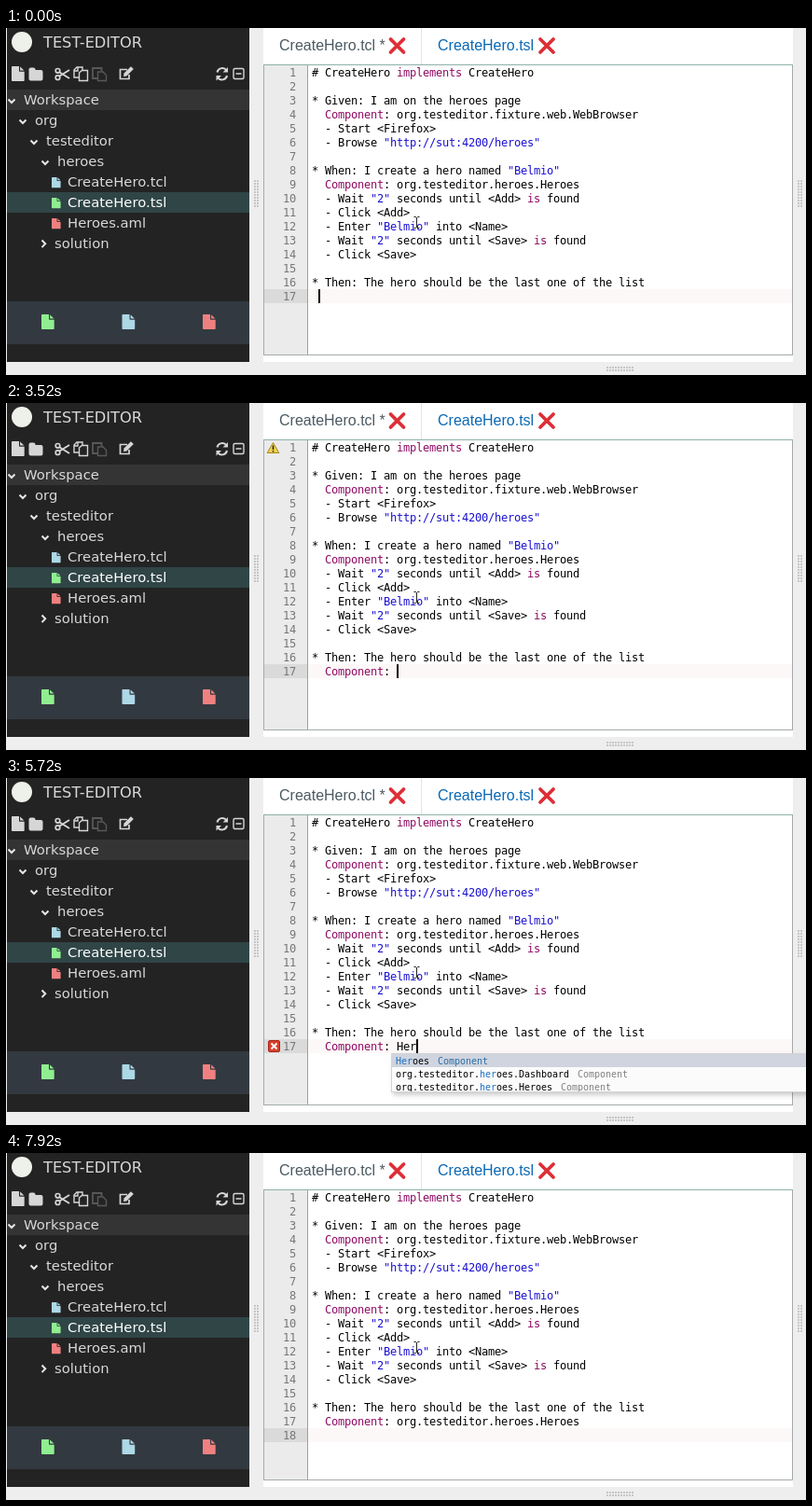
Write an HTML page that moves like this. It is 858 by 372 pixels and loops after 8000 ms.

```html
<!DOCTYPE html>
<html lang="en">
<head>
<meta charset="utf-8">
<title>Test editor</title>
<style>
  html, body { margin: 0; width: 100%; height: 100%; overflow: hidden; background: #eee; }
  #stage { position: absolute; left: 0; top: 0; width: 858px; height: 372px; overflow: hidden; }
  #stage div, #stage svg { position: absolute; }
  .text { white-space: pre; line-height: 22px; font-kerning: none; }
  .side { font: 14.8px/22px "DejaVu Sans", sans-serif; color: #d8d8d8; }
  .title { font: 16.2px/22px "DejaVu Sans", sans-serif; color: #d8d8d8; }
  .tab { font: 16px/22px "Liberation Sans", Arial, sans-serif; }
  .code { font: 12px/15px "DejaVu Sans Mono", monospace; white-space: pre; color: #000; }
  .small { font: 10px/16px "DejaVu Sans Mono", monospace; white-space: pre; color: #000; }
  .key { color: #8f0a63; }
  .str { color: #1a10d0; }
  #popup { left: 413px; top: 295px; width: 600px; box-sizing: border-box; overflow: hidden;
    background: #fbfbfb; border: 1px solid #d3d3d3; box-shadow: 2px 3px 5px rgba(0,0,0,.2); }
  #stage #popup .row { position: static; height: 14px; padding-left: 4px; }
  #popup .meta { color: #808080; margin-left: 9px; }
  #popup .hit { color: #1a6fc4; }
  #popup .on { background: #cfd4df; }
  #popup .on .meta { color: #2b6ea8; }
</style>
</head>
<body>
<div id="stage"></div>
<script>
const stage = document.getElementById('stage');

function el(parent, cls, text = '', css = {}) {
  const node = document.createElement('div');
  node.className = cls;
  node.textContent = text;
  Object.assign(node.style, css);
  parent.append(node);
  return node;
}
const px = n => n + 'px';
const box = (x, y, w, h, background) =>
  el(stage, '', '', { left: px(x), top: px(y), width: px(w), height: px(h), background });
const label = (cls, x, y, text, color) =>
  el(stage, 'text ' + cls, text, { left: px(x), top: px(y), ...(color && { color }) });

function span(parent, cls, text) {
  const node = document.createElement('span');
  node.className = cls;
  node.textContent = text;
  parent.append(node);
}

// Whole-pixel character cells, as a code editor lays them out
function cellSpacing(cls, cell) {
  const probe = el(stage, cls, '0'.repeat(100));
  const width = probe.getBoundingClientRect().width / 100;
  probe.remove();
  return px(cell - width);
}
const codeGap = cellSpacing('code', 7);
const smallGap = cellSpacing('small', 6);

// Panels
box(1, 0, 260, 357.5, '#232323');
box(1, 66, 260, 22, '#343434');
box(1, 176, 260, 22, '#304546');
box(1, 293, 260, 46, '#333940');
box(276, 0, 568, 357.5, '#fff');
box(445, 0, 1, 39, '#dfe6e5');
box(276, 39, 568, 312, '#a3abaa');
box(276, 39, 568, 1, '#8db0aa');
box(277, 40, 566, 310, '#fff');
box(277, 40, 46, 310, '#ebebeb');
box(323, 40, 1, 310, '#9f9f9f');
const activeGutter = box(277, 280, 46, 15, '#dadada');
const activeLine = box(324, 280, 519, 15, '#fdf8f8');

// Sidebar and tabs
label('title', 40, 5, 'TEST-EDITOR');
[[19, 'Workspace'], [31, 'org'], [43, 'testeditor'], [55, 'heroes'], [66, 'CreateHero.tcl'],
 [66, 'CreateHero.tsl', '#fff'], [66, 'Heroes.aml'], [52, 'solution']]
  .forEach(([x, text, color], i) => label('side', x, 66 + 22 * i, text, color));
label('tab', 293, 8, 'CreateHero.tcl *', '#4c5a62');
label('tab', 463, 8, 'CreateHero.tsl', '#0a68b4');

// Icons
const file = (x, y, s, color) =>
  `<g transform="translate(${x} ${y}) scale(${s})" fill="${color}">` +
  '<path d="M8 4.900q0 .8.8.8H13.700V15.200q0 .8-.8.8H.8Q0 16 0 15.200V.8Q0 0 .8 0H8zM9.100 4.600V.4q.4.2.6.5l3.200 3.200q.3.300.400.500z"/></g>';
const line = (d, color, width = 1.6) =>
  `<path d="${d}" fill="none" stroke="${color}" stroke-width="${width}"/>`;
const cross = x => `<g stroke-linecap="round">${line(`M${x - 7} 12l14 14M${x + 7} 12l-14 14`, '#dd2e36', 3.8)}</g>`;
const dots = (x, y, cols, rows) => {
  let d = '';
  for (let i = 0; i < cols; i++) for (let j = 0; j < rows; j++) d += `M${x + 3 * i} ${y + 3 * j}h2v2h-2z`;
  return `<path d="${d}" fill="#c6c6c6"/>`;
};
const pale = '#d6d6d6', dim = '#585858';
const green = '#90ee90', blue = '#add8e6', coral = '#f08080';

const art = [
  '<circle cx="17" cy="15" r="11" fill="#eef0ea"/>',
  file(6, 41, 1, pale),
  `<path d="M24.500 44.500q0-2 2-2h3q2 0 2 2v.5h6q2 0 2 2v7.500q0 2-2 2h-11q-2 0-2-2z" fill="${pale}"/>`,
  line('M57.500 47.500L68 54M57.500 51.500L68 45', pale, 2),
  `<g fill="none" stroke="${pale}" stroke-width="1.7"><circle cx="55.500" cy="45.800" r="2.300"/><circle cx="55.500" cy="53.200" r="2.300"/></g>`,
  line('M78 53H73V45L76 42H82V45M78.500 48L81.500 45.500H87.500V56.500H78.500ZM73 46H77V42', pale, 1.4),
  line('M98 54H93V43H102.500V46', dim, 1.8) + line('M98.500 47H104L107.500 50.500V56.500H98.500Z', dim, 1.4),
  line('M132 50V54.500H122.500V44.500H130', pale, 1.7),
  `<path d="M126 52l.6-3.400 7.400-7.400 2.800 2.800-7.400 7.400z" fill="${pale}"/>`,
  line('M226.500 47.500A5.500 5.500 0 0 1 236.500 45.500M237 51A5.500 5.500 0 0 1 227 53', pale, 2),
  `<path d="M238 42v5.500h-5.500zM225.500 56.500V51h5.500z" fill="${pale}"/>`,
  `<rect x="244" y="43.500" width="11" height="11" rx="1.500" fill="none" stroke="${pale}" stroke-width="1.400"/>`,
  line('M246.500 49H252.500', pale, 1.5),
  ...[0, 1, 2, 3].map(i => line(`M${2.5 + 12 * i} ${76.5 + 22 * i}l3.500 3.500 3.500-3.500`, '#e6e6e6', 2)),
  line('M38.500 227.500l3.700 3.800-3.700 3.800', '#e6e6e6', 2),
  ...[blue, green, coral].map((c, i) => file(49, 160 + 22 * i, 0.7, c)),
  ...[green, blue, coral].map((c, i) => file(38 + 86.5 * i, 307, 1, c)),
  cross(419.5), cross(580),
  dots(266, 163, 2, 10), dots(849, 163, 2, 10), dots(644, 363, 10, 2)
];

function svg(content) {
  const node = document.createElementNS('http://www.w3.org/2000/svg', 'svg');
  node.setAttribute('width', 858);
  node.setAttribute('height', 372);
  node.innerHTML = content;
  stage.append(node);
  return node;
}
svg(art.join(''));
const warning = svg('<path d="M286.500 42.500L292.800 53.500H280.200Z" fill="#f3d34a" stroke="#a5852a" stroke-linejoin="round"/>' +
  line('M286.500 45.500V50M286.500 51V52.500', '#222', 1.5));
const error = svg('<rect x="281.500" y="281.500" width="12" height="12" rx="1.500" fill="#d8402c" stroke="#a8271a"/>' +
  line('M284.500 284.500l6 6M290.500 284.500l-6 6', '#fff', 2));

// Code
function paint(node, text) {
  node.textContent = '';
  for (const part of text.split(/("[^"]*"|\b(?:implements|is|Component)\b)/)) {
    span(node, part[0] === '"' ? 'str' : /^(implements|is|Component)$/.test(part) ? 'key' : '', part);
  }
}
const source = `# CreateHero implements CreateHero

* Given: I am on the heroes page
  Component: org.testeditor.fixture.web.WebBrowser
  - Start <Firefox>
  - Browse "http://sut:4200/heroes"

* When: I create a hero named "Belmio"
  Component: org.testeditor.heroes.Heroes
  - Wait "2" seconds until <Add> is found
  - Click <Add>
  - Enter "Belmio" into <Name>
  - Wait "2" seconds until <Save> is found
  - Click <Save>

* Then: The hero should be the last one of the list
`.split('\n');

const rowTop = row => 40 + 15 * (row - 1);
const numbers = [], lines = [];
for (let i = 0; i < 18; i++) {
  const top = px(rowTop(i + 1) + 1);
  numbers.push(el(stage, 'code', i + 1, { right: px(858 - 311), top, color: '#777', letterSpacing: codeGap }));
  lines.push(el(stage, 'code', '', { left: '328px', top, letterSpacing: codeGap }));
  paint(lines[i], source[i] || '');
}
const caret = box(0, 0, 2, 15, '#000');
svg(line('M437.500 202.500H439.500L440.500 203.500L441.500 202.500H443.500M440.500 203V214M437.500 214.500H439.500L440.500 213.500L441.500 214.500H443.500', '#222', 1));

// Completion list
const names = ['Heroes', 'Dashboard', 'WebBrowser', 'org.testeditor.heroes.Dashboard',
  'org.testeditor.heroes.Heroes', 'org.testeditor.fixture.web.WebBrowser'];
const popup = el(stage, 'small', '', { letterSpacing: smallGap });
popup.id = 'popup';

function paintPopup(query, selected) {
  popup.style.display = query === null ? 'none' : '';
  popup.textContent = '';
  if (query === null) return;
  const matches = names.filter(name => name.toLowerCase().includes(query));
  popup.style.height = px(14 * matches.length);
  matches.forEach((name, i) => {
    const row = el(popup, i === selected ? 'row on' : 'row');
    const at = name.toLowerCase().indexOf(query), end = at + query.length;
    span(row, '', name.slice(0, at));
    span(row, 'hit', name.slice(at, end));
    span(row, '', name.slice(end));
    span(row, 'meta', 'Component');
  });
}

// Each step changes part of the state; typing always shows the caret
const type = (t, text, more) => [t, { text: '  ' + text, caret: true, ...more }];
const steps = [
  [0, { text: ' ', caret: true, warn: false, err: false, query: null, pick: 0, row: 17 }],
  type(100, ''), type(440, 'C'),
  [980, { caret: false }], [1070, { warn: true }],
  type(1250, 'Co'), type(1340, 'Com'), type(1480, 'Comp'),
  type(1620, 'Compo'), type(1700, 'Compon'), type(1780, 'Compone'), type(1870, 'Componen'),
  type(1950, 'Component'), type(2340, 'Component_'),
  [2990, { caret: false }],
  type(3150, 'Component'), type(3310, 'Component:'), type(3520, 'Component: '),
  [3920, { query: '' }],
  [4060, { caret: false }], [4150, { warn: false, err: true }], [4530, { caret: true }],
  type(5130, 'Component: H'), [5170, { query: 'h' }],
  type(5440, 'Component: He', { query: 'he' }),
  type(5720, 'Component: Her', { query: 'her' }),
  [6100, { pick: 1 }], [6330, { caret: false }], [6370, { pick: 2 }],
  type(6650, 'Component: org.testeditor.heroes.Heroes', { query: null }),
  [7200, { row: 18 }], [7250, { err: false }], [7920, { caret: false }]
];
const LOOP = 8000;

function render(s) {
  const column = s.row === 17 ? s.text.length : 2;
  paint(lines[16], s.text);
  numbers[17].style.display = s.row === 18 ? '' : 'none';
  activeGutter.style.top = activeLine.style.top = caret.style.top = px(rowTop(s.row));
  caret.style.left = px(328 + 7 * column);
  caret.style.display = s.caret ? '' : 'none';
  warning.style.display = s.warn ? '' : 'none';
  error.style.display = s.err ? '' : 'none';
  paintPopup(s.query, s.pick);
}

let shown = 0;
function tick() {
  const t = performance.now() % LOOP;
  const past = steps.filter(step => step[0] <= t);
  if (past.length !== shown) {
    shown = past.length;
    render(Object.assign({}, ...past.map(step => step[1])));
  }
  requestAnimationFrame(tick);
}
tick();
</script>
</body>
</html>
```
